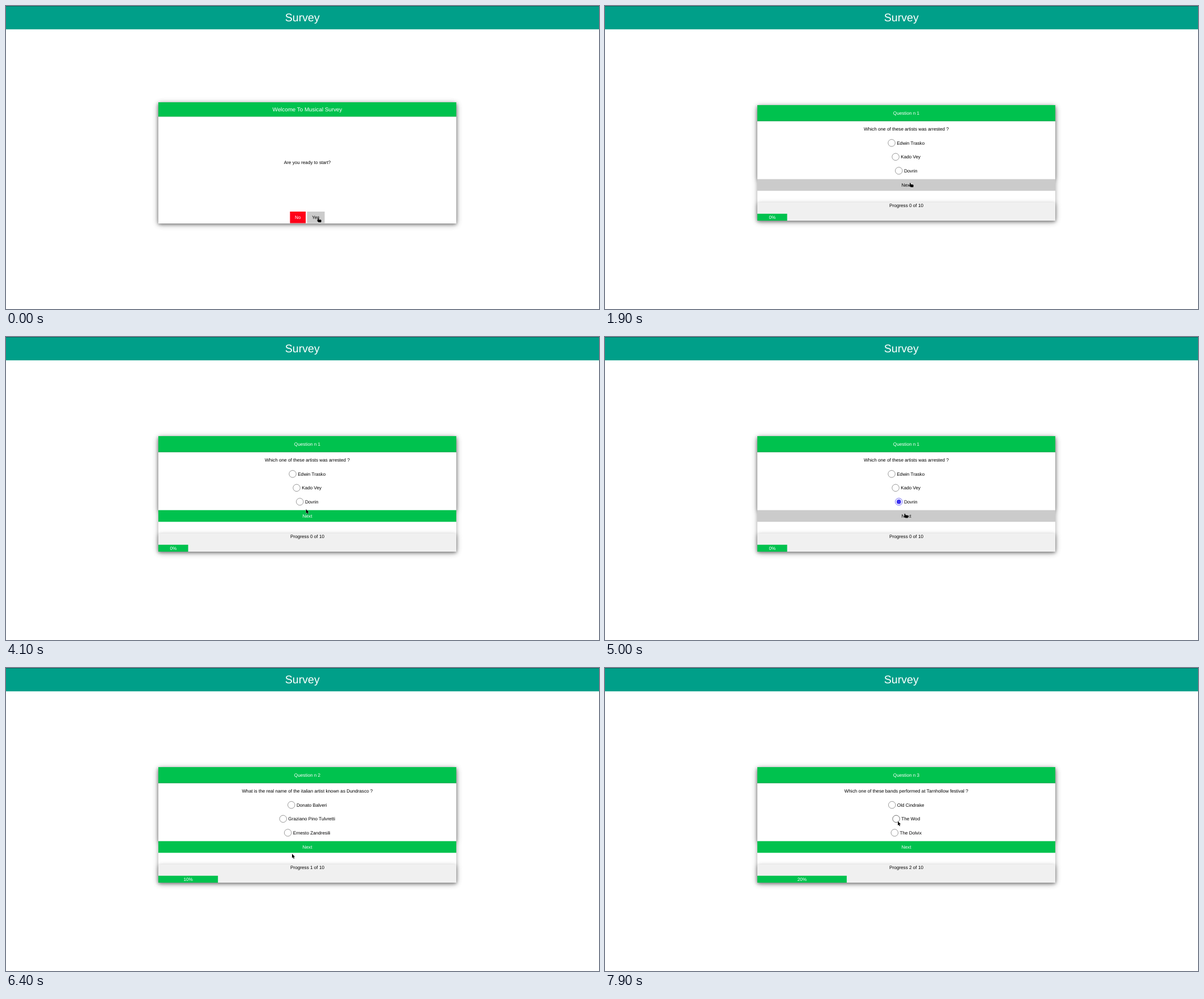
Animation of 1047 by 535 pixels, one loop 8 s. Source, as an HTML page:

```html
<!DOCTYPE html>
<html lang="en">
<head>
<meta charset="utf-8">
<title>Survey</title>
<style>
  html, body { margin: 0; width: 100%; height: 100%; overflow: hidden; background: #fff; }
  .card {
    position: absolute; left: 269px; width: 526px; background: #fff;
    box-shadow: 0 2.2px 5.5px rgba(0, 0, 0, .22), 0 2.2px 11px rgba(0, 0, 0, .2);
  }
  .card .card { left: 0; }
  svg { position: absolute; left: 0; top: 0; }
  text {
    font: 8.18px "Liberation Sans", Arial, sans-serif;
    text-anchor: middle; text-rendering: geometricPrecision;
  }
  .light { fill: #fff; }
  .green { fill: #00c24e; }
  .ring { fill: #fff; stroke-width: .75; }
  .cursor { fill: #000; stroke: #fff; stroke-width: .55; stroke-linejoin: round; paint-order: stroke; }
</style>
</head>
<body>
<div class="intro card" style="top:170px;height:214px">
  <div class="card" style="top:0;height:214px"></div>
</div>
<div class="quiz card" style="top:175px;height:204px">
  <div class="card" style="top:0;height:131px"></div>
  <div class="card" style="top:172px;height:32px;background:#f0f0f0"></div>
</div>
<svg width="1047" height="535" viewBox="0 0 1047 535">
  <rect width="1047" height="41.2" fill="#009f89"/>
  <rect width="1047" height=".8" fill="#0b625a"/>
  <text class="light" x="523.2" y="27.3" style="font-size:19.63px">Survey</text>

  <g class="intro">
    <rect class="green" x="269" y="170" width="526" height="25.6"/>
    <rect x="269" y="195.4" width="526" height=".6" fill="#b9c9bd"/>
    <text class="light" x="532" y="186.3" style="font-size:9.82px">Welcome To Musical Survey</text>
    <text x="532" y="279.3">Are you ready to start?</text>
    <rect x="501.4" y="363" width="27.8" height="20.5" fill="#ff0018"/>
    <text class="light" x="515.3" y="376.1">No</text>
    <rect x="531.5" y="363" width="31.1" height="20.5" fill="#cbcbcb"/>
    <text x="547" y="376.1">Yes</text>
  </g>

  <g class="quiz">
    <rect class="green" x="269" y="175" width="526" height="28.2"/>
    <rect x="269" y="202.6" width="526" height=".7" fill="#0a8f40"/>
    <text class="light" id="title" x="532" y="191.8"></text>
    <text id="ask" x="532" y="220.2"></text>
    <g id="options"></g>
    <rect id="next" x="269" y="305.7" width="526" height="20.6"/>
    <text id="nextLabel" x="532" y="318.7">Next</text>
    <text id="progress" x="532" y="355.3"></text>
    <rect class="green" id="bar" x="269" y="366.8" height="12.2"/>
    <text class="light" id="percent" y="375.8"></text>
  </g>

  <path class="cursor" id="cursor"/>
</svg>
<script>
const LOOP = 8000, TICK = 100, TRAVEL = 300;
const GREEN = '#00c24e', GREY = '#cbcbcb', BLUE = '#3c32f0';
const ARROW = 'M0 0V7.4L1.7 5.9 2.9 8.8 4.2 8.2 3 5.4H5.2Z';
const HAND = 'M.1.6Q.9-.3 1.6.7L2.1 3 5.6 3.2Q7 3.6 6.8 5L6.3 8H2L-.8 5.2Q-1 4 .4 4.5Z';

const questions = [
  { ask: 'Which one of these artists was arrested ?',
    options: ['Edwin Trasko', 'Kado Vey', 'Dovrin'], start: 1400, picked: 4800 },
  { ask: 'What is the real name of the italian artist known as Dundrasco ?',
    options: ['Donato Balveri', 'Graziano Pino Tulvretti', 'Ernesto Zandresili'], start: 5300, picked: 7000 },
  { ask: 'Which one of these bands performed at Tarnhollow festival ?',
    options: ['Old Cindrake', 'The Wod', 'The Dolvix'], start: 7500, picked: LOOP }
];

// Places the pointer rests at: arrival time, x, y
const stops = [
  [0, 550, 374], [400, 550, 370.5], [1900, 538, 312], [2100, 521, 292],
  [2800, 513.5, 270], [3800, 517, 272], [4200, 536, 320], [4400, 518.5, 291],
  [5000, 528.5, 311.5], [5900, 520.3, 271], [6400, 505, 328], [6700, 497.3, 302],
  [7000, 497, 291], [7200, 501, 312], [7500, 504, 296], [7900, 517, 270.5]
];

const $ = id => document.getElementById(id);
const show = (name, on) => document.querySelectorAll('.' + name)
  .forEach(el => { el.style.display = on ? '' : 'none'; });

function set(el, attrs) {
  for (const key in attrs) el.setAttribute(key, attrs[key]);
}

function add(tag, attrs) {
  const el = document.createElementNS('http://www.w3.org/2000/svg', tag);
  set(el, attrs);
  return $('options').appendChild(el);
}

const rows = [0, 1, 2].map(i => {
  const y = 241.8 + i * 24.54;
  return {
    y,
    ring: add('circle', { class: 'ring', cy: y, r: 6.25 }),
    dot: add('circle', { cy: y, r: 3.9, fill: BLUE }),
    label: add('text', { x: 539.7, y: y + 3 })
  };
});

// Rests at each stop, then travels evenly to arrive at the next on time
function pointerAt(t) {
  const i = stops.findIndex(stop => stop[0] >= t);
  const [time, x, y] = stops[i < 0 ? stops.length - 1 : i];
  if (i < 1) return { x, y };
  const [left, fromX, fromY] = stops[i - 1];
  const span = Math.min(TRAVEL, time - left);
  const k = Math.max(0, 1 - (time - t) / span);
  return { x: fromX + (x - fromX) * k, y: fromY + (y - fromY) * k };
}

function drawQuestion(index, t, { x, y }, onNext) {
  const { ask, options, picked } = questions[index];
  $('title').textContent = `Question n ${index + 1}`;
  $('ask').textContent = ask;
  rows.forEach((row, i) => {
    row.label.textContent = options[i];
    const cx = 539.7 - row.label.getComputedTextLength() / 2 - 9.1;
    const checked = i === 2 && t >= picked;
    const hover = Math.hypot(x - cx, y - row.y) < 6.6;
    set(row.ring, { cx, stroke: checked ? BLUE : hover ? '#444' : '#767676' });
    set(row.dot, { cx, visibility: checked ? 'visible' : 'hidden' });
  });
  set($('next'), { fill: onNext ? GREY : GREEN });
  set($('nextLabel'), { fill: onNext ? '#000' : '#fff' });
  const width = 52.6 * (index + 1);
  set($('bar'), { width });
  set($('percent'), { x: 269 + width / 2 });
  $('progress').textContent = `Progress ${index} of 10`;
  $('percent').textContent = `${index * 10}%`;
}

function draw(t) {
  const index = questions.filter(q => t >= q.start).length - 1;
  const pointer = pointerAt(t);
  const onNext = index >= 0 && pointer.y > 305.7 && pointer.y < 326.3;
  show('intro', index < 0);
  show('quiz', index >= 0);
  if (index >= 0) drawQuestion(index, t, pointer, onNext);
  // The hand lingers briefly after the first click
  set($('cursor'), {
    d: onNext || t < questions[0].start + 200 ? HAND : ARROW,
    transform: `translate(${pointer.x} ${pointer.y})`
  });
}

const origin = performance.now();
let last = -1;

function frame() {
  const t = Math.floor((performance.now() - origin) % LOOP / TICK) * TICK;
  if (t !== last) draw(last = t);
  requestAnimationFrame(frame);
}
frame();
</script>
</body>
</html>
```
